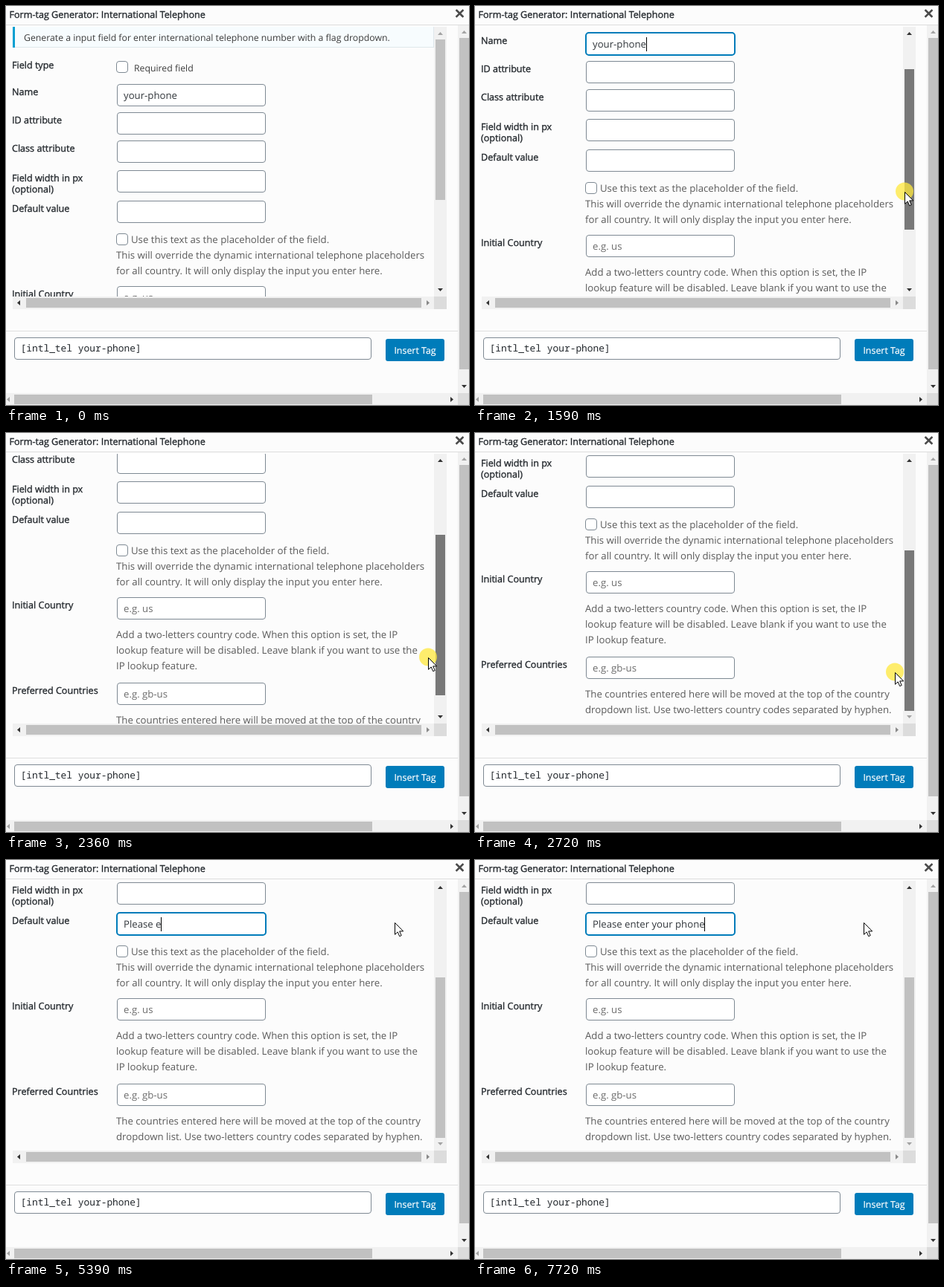
An HTML page for the animation above (8 s loop, 622x537 px).

```html
<!DOCTYPE html>
<html lang="en">
<head>
<meta charset="utf-8">
<title>Form-tag Generator</title>
<style>
html, body { margin: 0; width: 100%; height: 100%; overflow: hidden; background: #fcfcfc; }
svg { display: block; width: 622px; height: 537px; }
text { font-family: "Open Sans", "Noto Sans", sans-serif; white-space: pre; text-rendering: geometricPrecision; }
.label { font-size: 12.58px; fill: #23282d; stroke: #23282d; stroke-width: .35; }
.small { font-size: 12.28px; fill: #3c3c3c; }
.help { font-size: 13.23px; fill: #5a5a5a; }
.value { font-size: 13.2px; fill: #32373c; }
.hint { font-size: 13.2px; fill: #6c6c6c; }
.mono { font-family: "Noto Sans Mono", "DejaVu Sans Mono", monospace; font-size: 12.88px; fill: #23282d; }
.button { font-size: 12.42px; fill: #fff; stroke: #fff; stroke-width: .2; text-anchor: middle; }
.box { fill: #fff; stroke: #7e8993; stroke-width: 1; }
.focus { fill: #fff; stroke: #007cba; stroke-width: 2; }
</style>
</head>
<body>
<svg viewBox="0 0 622 537">
  <defs><clipPath id="view"><rect x="8" y="28" width="567" height="363"/></clipPath></defs>
  <rect width="622" height="537" fill="#fcfcfc"/>
  <g clip-path="url(#view)"><g id="form"></g></g>
  <g id="frame"></g>
  <g id="pointer">
    <circle id="glow" r="12" cy="-.5" fill="#ffe83c" opacity=".75"/>
    <path id="arrow" d="M.5 .5V16.3L4.2 12.9L6.7 18.7L9.2 17.6L6.7 11.9H11.7Z" fill="#fff" stroke="#000"/>
    <path id="beam" d="M-3 -8.5H-1L0 -7.5L1 -8.5H3M0 -7.5V7.5M-3 8.5H-1L0 7.5L1 8.5H3" fill="none" stroke="#000"/>
  </g>
</svg>
<script>
const $ = id => document.getElementById(id);
const form = $('form'), frame = $('frame');

function add(parent, tag, attrs, content) {
  const el = document.createElementNS('http://www.w3.org/2000/svg', tag);
  for (const k in attrs) el.setAttribute(k, attrs[k]);
  if (content) el.textContent = content;
  return parent.appendChild(el);
}
const rect = (p, x, y, width, height, fill, rx = 0) => add(p, 'rect', { x, y, width, height, fill, rx });
const text = (p, x, y, cls, s) => add(p, 'text', { x, y, class: cls }, s);
const label = (y, s) => text(form, 8, y, 'label', s);
const help = (y, lines) => lines.forEach((s, i) => text(form, 148, y + 21 * i, 'help', s));
const field = (p, x, y, w) => add(p, 'rect', { x: x + .5, y: y + .5, width: w - 1, height: 29, rx: 3.5, class: 'box' });
const check = y => add(form, 'rect', { x: 148.5, y: y + .5, width: 15, height: 15, rx: 3.5, class: 'box' });
const show = (el, on) => el.setAttribute('visibility', on ? 'visible' : 'hidden');
const triangle = (x, y, turn, fill) =>
  add(frame, 'path', { d: 'M-3.5 2H3.5L0 -2Z', transform: `translate(${x} ${y}) rotate(${turn})`, fill });

// Scrolling form
rect(form, 9, 28, 566, 28, '#dfe8ec');
rect(form, 9, 28, 565, 27, '#f7fcfe');
rect(form, 9, 28, 3, 28, '#00a0d2');
text(form, 24, 47, 'small', 'Generate a input field for enter international telephone number with a flag dropdown.');
label(84, 'Field type');
check(74);
text(form, 172, 88, 'small', 'Required field');

const rows = [
  [105, 'Name'], [143, 'ID attribute'], [181, 'Class attribute'], [221, 'Field width in px'],
  [262, 'Default value'], [377, 'Initial Country', 'e.g. us'], [492, 'Preferred Countries', 'e.g. gb-us']
];
for (const [y, name, hint] of rows) {
  label(y + 15, name);
  field(form, 149, y, 200);
  if (hint) text(form, 158, y + 20, 'hint', hint);
}
label(251, '(optional)');
check(306);
text(form, 168, 319, 'help', 'Use this text as the placeholder of the field.');
help(340, ['This will override the dynamic international telephone placeholders',
  'for all country. It will only display the input you enter here.']);
help(432, ['Add a two-letters country code. When this option is set, the IP',
  'lookup feature will be disabled. Leave blank if you want to use the', 'IP lookup feature.']);
help(547, ['The countries entered here will be moved at the top of the country',
  'dropdown list. Use two-letters country codes separated by hyphen.']);

function entry(y, s) {
  const ring = add(form, 'rect', { x: 149, y, width: 200, height: 30, rx: 4, class: 'focus' });
  const value = text(form, 158, y + 20, 'value', s);
  const caret = rect(form, 158, y + 6, 1, 19, '#000');
  return { ring, value, caret };
}
const nameBox = entry(105, 'your-phone'), valueBox = entry(262, '');

// Fixed frame
text(frame, 4.5, 16, 'label', 'Form-tag Generator: International Telephone');
rect(frame, 0, 25, 622, 1, '#ddd');
add(frame, 'path', { d: 'M605.5 6L613.5 14M613.5 6L605.5 14', stroke: '#4a4a4a', 'stroke-width': 2.6, 'stroke-linecap': 'square' });
rect(frame, 575, 28, 17, 363, '#f1f1f1');
const thumb = rect(frame, 577, 45, 13, 216, '#c1c1c1');
const up = triangle(583.5, 37, 0), down = triangle(583.5, 382, 180);
rect(frame, 9, 391, 566, 17, '#f1f1f1');
rect(frame, 27, 393, 531, 13, '#c1c1c1');
rect(frame, 575, 391, 17, 17, '#dcdcdc');
triangle(17, 399.5, -90, '#333');
triangle(567, 399.5, 90, '#888');
rect(frame, 607, 26, 15, 495, '#f1f1f1');
rect(frame, 609, 43, 13, 446, '#c1c1c1');
triangle(615.5, 35, 0, '#a3a3a3');
triangle(615.5, 512, 180, '#333');
rect(frame, 0, 521, 607, 16, '#f1f1f1');
rect(frame, 11, 523, 481, 13, '#c1c1c1');
rect(frame, 607, 521, 15, 16, '#dcdcdc');
triangle(3, 529.5, -90, '#a3a3a3');
triangle(599, 529.5, 90, '#333');
rect(frame, 0, 437, 607, 1, '#dfdfdf');
field(frame, 11, 446, 480);
text(frame, 19.5, 465, 'mono', '[intl_tel your-phone]');
rect(frame, 510, 448, 79, 30, '#007cba', 3);
text(frame, 549.5, 468, 'button', 'Insert Tag');

// Timeline
const LOOP = 8000, PRESS = 950, RELEASE = 2890, CLICK = 3500;
const TRAVEL = 113, SCROLL = 191, GRAB = 209;
const bursts = [[500, 800, 5], [950, 1740, 11], [1820, 2590, 11], [2640, 2720, 2], [2890, 3660, 11], [3740, 4000, 4]];
const path = [
  [500, 606, 196], [800, 582, 209], [950, 582, 209], [1029, 581, 216.7], [1582, 577, 249.8], [1740, 575, 259],
  [1974, 570, 275.9], [2590, 565, 317], [2720, 564, 322], [2890, 564, 322], [3430, 276, 92], [3583, 276, 92],
  [3660, 270, 105], [3740, 290, 104], [4000, 522, 84]
];
const phrase = 'Please enter your phone';
const keys = [4450, 4700, 4700, 4870, 4920, 5170, 5320, 5390, 5570, 5720, 5790, 5940, 6020,
  6400, 6500, 6820, 6880, 7030, 7260, 7340, 7490, 7650, 7720];

function snap(t) {
  let out = 0;
  for (const [a, b, n] of bursts) {
    if (t < a) break;
    const step = (b - a) / (n - 1);
    out = Math.min(b, a + Math.floor((t - a + 6) / step) * step);
  }
  return out;
}

function position(t) {
  const i = path.findIndex(p => p[0] > t);
  if (i < 0) return path[path.length - 1].slice(1);
  if (i === 0) return path[0].slice(1);
  const [t0, x0, y0] = path[i - 1], [t1, x1, y1] = path[i];
  const k = (t - t0) / (t1 - t0);
  return [x0 + (x1 - x0) * k, y0 + (y1 - y0) * k];
}

function draw(t) {
  const [x, y] = position(snap(t));
  const drag = t >= PRESS && t < RELEASE;
  const d = t < PRESS ? 0 : drag ? Math.max(0, Math.min(TRAVEL, y - GRAB)) : TRAVEL;

  form.setAttribute('transform', `translate(0 ${-Math.round(d * SCROLL / TRAVEL)})`);
  thumb.setAttribute('y', 45 + Math.floor(d));
  const hover = t >= 500 && t < PRESS && x < 590;
  thumb.setAttribute('fill', drag ? '#787878' : hover ? '#a8a8a8' : '#c1c1c1');
  up.setAttribute('fill', d > 0 ? '#333' : '#a3a3a3');
  down.setAttribute('fill', d < TRAVEL ? '#333' : '#a3a3a3');

  const inName = t >= PRESS && t < CLICK, inValue = t >= CLICK;
  show(nameBox.ring, inName);
  show(nameBox.caret, inName);
  nameBox.caret.setAttribute('x', Math.round(158 + nameBox.value.getComputedTextLength()));

  const typed = phrase.slice(0, keys.filter(k => k <= t).length);
  if (valueBox.value.textContent !== typed) valueBox.value.textContent = typed;
  const width = typed ? valueBox.value.getComputedTextLength() : 0;
  show(valueBox.ring, inValue);
  show(valueBox.caret, inValue && !(t >= 4150 && t < 4450));
  valueBox.caret.setAttribute('x', Math.floor(158 + width));

  const overField = t > RELEASE && x > 149 && x < 349 && y > 71 && y < 101;
  $('pointer').setAttribute('transform', `translate(${Math.round(x)} ${Math.round(y)})`);
  show($('arrow'), t >= 500 && !overField);
  show($('beam'), overField);
  show($('glow'), drag || (t >= CLICK && t < 3650));
}

function tick(now) {
  draw(now % LOOP);
  requestAnimationFrame(tick);
}
draw(0);
requestAnimationFrame(tick);
</script>
</body>
</html>
```
